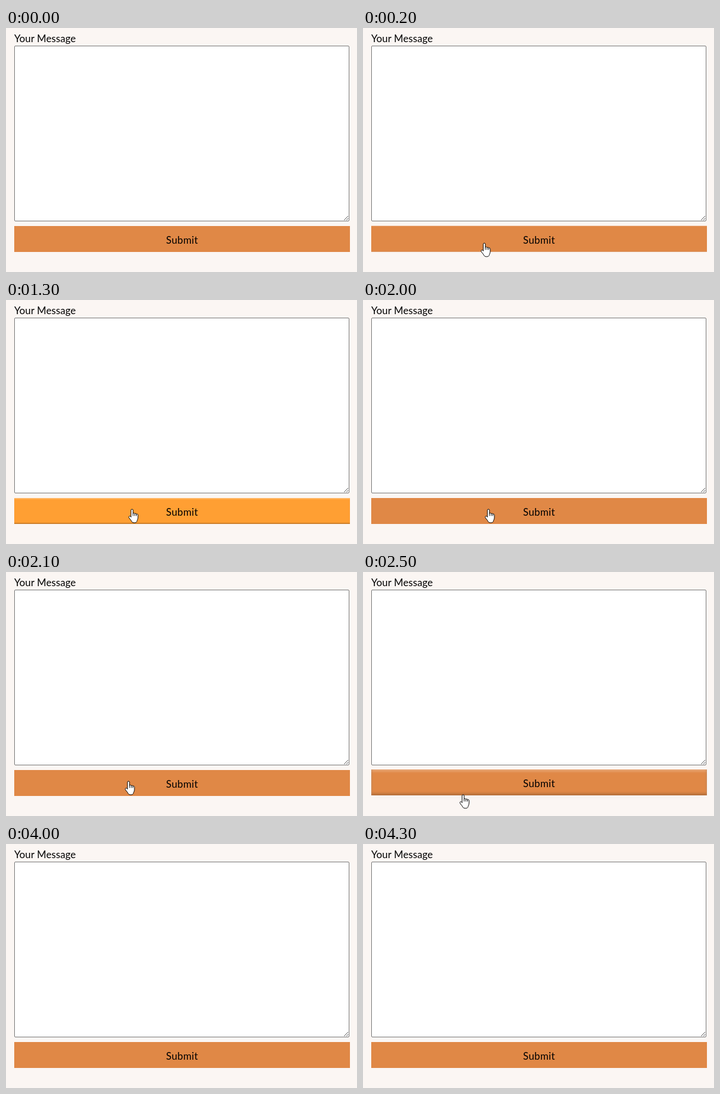
An HTML page for the animation above (4.9 s loop, 596 px wide and 414 px high).

```html
<!DOCTYPE html>
<html lang="en">
<head>
<meta charset="utf-8">
<title>Message form</title>
<style>
  html, body { margin: 0; width: 100%; height: 100%; overflow: hidden; }
  body { position: relative; background: #fbf6f3; color: #000; font: 17px Lato, sans-serif; }
  body > * { position: absolute; box-sizing: border-box; }
  .label { left: 14px; top: 8px; line-height: 20px; letter-spacing: .1px; white-space: nowrap; }
  .field {
    left: 14px; top: 30px; width: 569px; height: 298px;
    background: #fff; border: 1px solid #767676; border-radius: 2px;
  }
  .grip { left: 573px; top: 318px; }
  .button {
    left: 14px; top: 336px; width: 570px; height: 44px;
    background: #e08846; text-align: center; line-height: 48px; letter-spacing: .4px;
  }
  .cursor { left: 1px; top: .5px; overflow: visible; opacity: 0; }
</style>
</head>
<body>
<div class="label">Your Message</div>
<div class="field"></div>
<svg class="grip" width="9" height="9" fill="none" stroke="#555">
  <path d="M1 8 8 1M5 8 8 5"/>
</svg>
<div class="button">Submit</div>
<svg class="cursor" id="hand" width="18" height="26" fill="#fff" stroke="#000" stroke-linejoin="round" stroke-linecap="round">
  <path d="M4.2 14V2.8a1.8 1.8 0 0 1 3.6 0V8.2c.3-1 2.7-.9 3 .4c.5-.8 2.5-.5 2.7.7c.8-.6 2.6-.1 2.6 1.4V15c0 2-.6 3.4-1.3 4.8c-.6 1.3-.5 2.5-1.7 3.4c-1.5 1-5.3 1-6.6-.1c-1-.9-1.4-2-2.2-3.2L1 15.8C.2 14 .6 13 1.7 12.8c1-.2 1.8.4 2.5 1.2z"/>
  <path fill="none" d="M7.8 8.2V12M10.8 8.6V12M13.5 9.3V12"/>
</svg>
<svg class="cursor" id="arrow" width="13" height="20" fill="#000" stroke="#fff">
  <path d="M.5 .5V16L4.2 12.6 6.7 18.5 9.3 17.4 6.8 11.6H11.7z"/>
</svg>
<script>
const LOOP = 4900;
const FLAT = '#e08846', PRESSED = '#ff9f33';

// time, cursor x, cursor y, hover amount, cursor kind, pressed
const poses = [
  [0, 195, 369, 0, ''],
  [100, 195, 369, 0, 'hand'],
  [200, 199, 363, .25, 'hand'],
  [300, 203, 358, .5, 'hand'],
  [400, 205, 355, .75, 'hand'],
  [500, 206, 353, 1, 'hand'],
  [600, 207, 353, 1, 'hand'],
  [1300, 207, 353, 0, 'hand', true],
  [2000, 206, 353, 0, 'hand'],
  [2100, 201, 353, 0, 'hand'],
  [2200, 194, 355, .25, 'hand'],
  [2300, 186, 361, .5, 'hand'],
  [2400, 175, 368, .75, 'hand'],
  [2500, 163, 376, 1, 'hand'],
  [2600, 158, 387, .5, 'arrow'],
  [2700, 158, 387, 0, ''],
  [LOOP, 158, 387, 0, '']
];

const bevel = (size, blur, light, dark, glow) =>
  `inset 0 ${-size}px ${blur}px rgba(0,0,0,${dark}), ` +
  `inset 0 ${size}px ${blur}px rgba(255,255,255,${light}), ` +
  `0 6px 10px -4px rgba(0,0,0,${glow})`;

function play(selector, style) {
  const frames = poses.map(pose => ({
    offset: pose[0] / LOOP, easing: 'step-end', ...style(...pose)
  }));
  document.querySelector(selector).animate(frames, { duration: LOOP, iterations: Infinity })
    .startTime = 0;
}

play('.button', (time, x, y, hover, kind, pressed) => ({
  backgroundColor: pressed ? PRESSED : FLAT,
  transform: `translateY(${-hover}px)`,
  boxShadow: pressed
    ? bevel(2, 1, .22, .2, 0)
    : bevel(3 * hover, 4 * hover, .28 * hover, .22 * hover, .03 * hover)
}));

for (const name of ['hand', 'arrow']) {
  play('#' + name, (time, x, y, hover, kind) => ({
    opacity: kind === name ? 1 : 0,
    transform: `translate(${x}px, ${y}px)`
  }));
}
</script>
</body>
</html>
```
